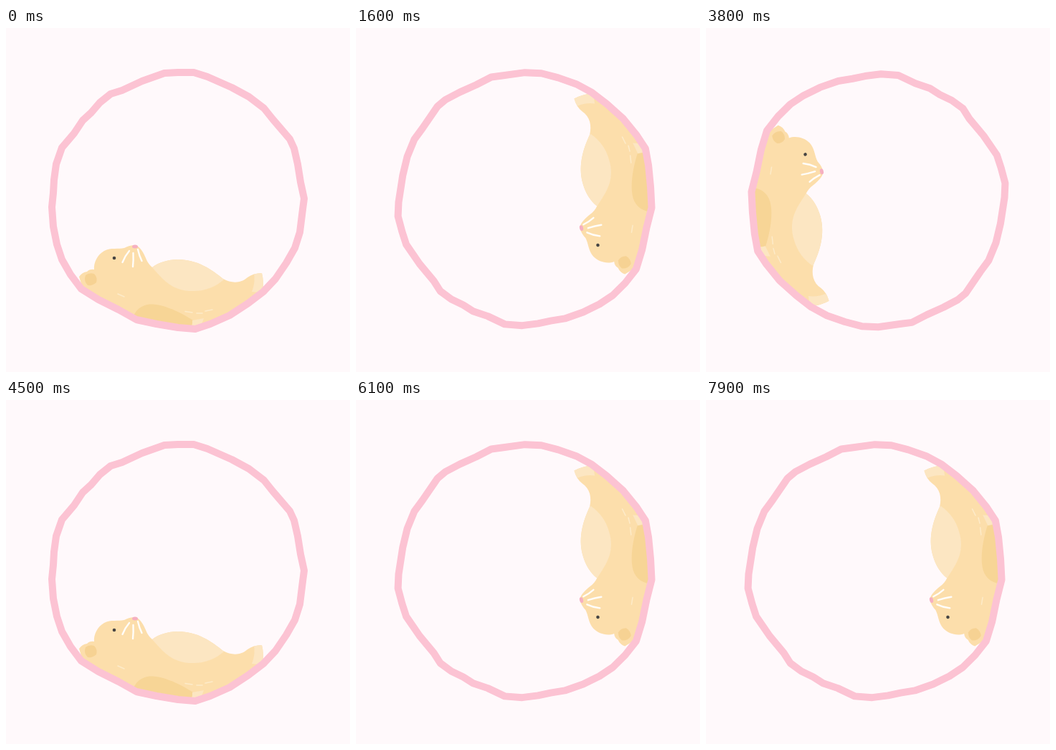
Recreate the animation shown at these times as an HTML page. Size 480 px wide and 480 px high, loop 8 s.

```html
<!DOCTYPE html>
<html lang="en">
<head>
<meta charset="utf-8">
<title>Rolling bear</title>
<style>
  html, body { margin: 0; width: 100%; height: 100%; overflow: hidden; background: #fff9fb; }
  svg { display: block; width: 100vw; height: 100vh; }
</style>
</head>
<body>
<svg viewBox="0 0 480 480">
  <defs>
    <path id="body" d="M107 363 L102 347 Q106 341 113 340 Q117 336 123 337
      C122 327 128 316 137 311 C146 306 157 309 165 307 C171 304 177 302 183 304
      C188 307 192 314 195 321 Q198 329 204 334
      C213 327 226 323 240 323 C267 323 287 337 303 350
      C314 356 327 357 337 348 Q345 342 357 342 Q360 353 358 368
      L335 390 L300 405 L262 418 L210 412 L182 405 L130 378 Z"/>
    <clipPath id="inside"><use href="#body"/></clipPath>
  </defs>
  <g id="wheel">
    <use href="#body" fill="#fcdeab"/>
    <g clip-path="url(#inside)">
      <path fill="#fce6c2" d="M203 333 C214 326 226 322 240 322 C268 322 288 336 304 351
        C293 361 278 367 262 367 C236 368 222 354 212 343 Z"/>
      <path fill="#fce6c2" d="M346 343 L359 340 L362 370 L343 368 Q348 356 346 343 Z"/>
      <path fill="#f7d596" d="M176 408 Q180 390 197 386 C214 383 241 395 261 408 L258 418 L205 414 Z"/>
      <path fill="#fce6c2" d="M260 408 L276 405 L272 416 L260 417 Z"/>
    </g>
    <path fill="#f6d293" d="M111 345 Q116 341 123 343 Q128 348 126 355 Q121 360 114 359 Q108 353 111 345 Z"/>
    <path fill="none" stroke="#fdebc9" stroke-width="1.5" stroke-linecap="round"
      d="M156 371 L165 375 M250 395.500 L260 397 M266 398 L274 398 M278 395 L288 393"/>
    <path fill="none" stroke="#fffdf9" stroke-width="2.400" stroke-linecap="round"
      d="M172 311 Q166 318 162.500 327 M177.500 314 Q178 324 177 333 M184 309 Q186 318 189.500 325"/>
    <ellipse cx="180" cy="305" rx="4" ry="2.500" fill="#f6b0c1"/>
    <circle cx="151" cy="321" r="2.300" fill="#464442"/>
    <polygon fill="none" stroke="#fcc3d3" stroke-width="10" stroke-linejoin="round" points="
      240,62 221,63 190,74 162,87 146,92 131,104 119,118 107,129 95,147 78,167 70,190
      67,212 66,230 64,250 66,277 71,302 78,323 90,344 105,364 129,379 157,393 182,407
      210,413 240,418 264,420 285,413 312,401 338,384 359,368 376,350 391,328 403,307
      410,285 414,253 416,238 411,215 407,190 402,168 396,155 372,127 360,112 339,96
      315,83 281,68 262,62"/>
  </g>
</svg>
<script>
  const LOOP = 8000, STEP = 100, POSES = 9;
  const wheel = document.getElementById('wheel');

  // Stepped roll: a tenth of a turn per pose, with a larger hop back to rest.
  function draw(time) {
    const pose = Math.floor((time % LOOP) / STEP) % POSES;
    wheel.setAttribute('transform', pose
      ? `translate(238 239.7) rotate(${3 + 36 * pose}) translate(-237.9 -241.3)`
      : '');
  }

  const start = performance.now();
  function tick() {
    draw(performance.now() - start);
    requestAnimationFrame(tick);
  }
  tick();
</script>
</body>
</html>
```
